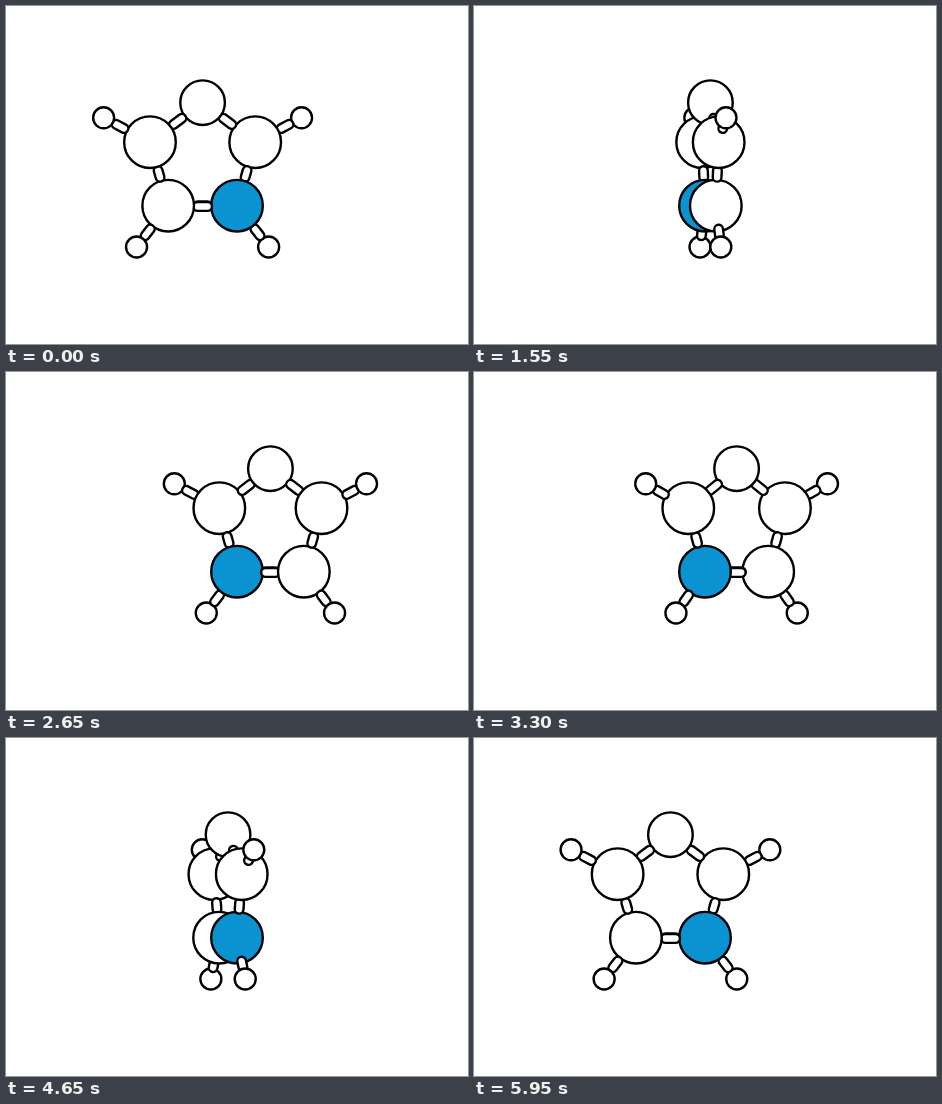
An HTML page with a canvas that plays this animation: 462 by 338 pixels, repeating every 6 s.

```html
<!DOCTYPE html>
<html lang="en">
<head>
<meta charset="utf-8">
<title>Rotating ring molecule</title>
<style>
  html, body { margin: 0; width: 100%; height: 100%; overflow: hidden; background: #fff; }
  canvas { display: block; }
</style>
</head>
<body>
<canvas id="stage" width="462" height="338"></canvas>
<script>
const ctx = document.getElementById('stage').getContext('2d');
const LOOP = 6000, STEP = 50, START = Math.PI / 30;
const AXIS = 231, MID = -34.6;      // the ring turns about the blue atom
const LINE = 2.4, BOND_R = 4.35, OVERLAP = 1.8;

// Positions in the ring plane: x is measured from the rotation axis.
const atom = (dx, y, r, color = '#fff') => ({ x: MID + dx, y, r, color });
const blue = atom(34.6, 199.7, 25.8, '#0a92d1');
const low = atom(-34.6, 199.7, 25.8);
const left = atom(-52.9, 136.2, 25.8);
const right = atom(52.9, 136.2, 25.8);
const top_ = atom(0, 96.7, 22.3);
const tips = [
  atom(-99.5, 111.8, 10.5), atom(99.5, 111.8, 10.5),
  atom(-66.4, 241, 10.5), atom(66.4, 241, 10.5)
];

// A capsule that fills the gap between two atoms and slightly overlaps both.
function bond(a, b, dy = 0) {
  const dx = b.x - a.x, h = b.y - a.y, len = Math.hypot(dx, h);
  const mid = (a.r + len - b.r) / 2;
  const half = (len - a.r - b.r) / 2 + OVERLAP - BOND_R - LINE / 2;
  const at = d => ({ x: a.x + dx * d / len, y: a.y + h * d / len + dy });
  return { x: at(mid).x, from: at(mid - half), to: at(mid + half) };
}

const parts = [
  blue, low, left, right, top_, ...tips,
  bond(low, blue), bond(low, blue, 0.8),
  bond(left, low), bond(right, blue), bond(left, top_), bond(right, top_),
  bond(left, tips[0]), bond(right, tips[1]), bond(low, tips[2]), bond(blue, tips[3])
];

function drawAtom(p, cos) {
  ctx.beginPath();
  ctx.arc(AXIS + p.x * cos, p.y, p.r, 0, Math.PI * 2);
  ctx.fillStyle = p.color;
  ctx.fill();
  ctx.lineWidth = LINE;
  ctx.strokeStyle = '#000';
  ctx.stroke();
}

function drawBond(p, cos) {
  ctx.beginPath();
  ctx.moveTo(AXIS + p.from.x * cos, p.from.y);
  ctx.lineTo(AXIS + p.to.x * cos, p.to.y);
  for (const [color, grow] of [['#000', LINE], ['#fff', -LINE]]) {
    ctx.strokeStyle = color;
    ctx.lineWidth = BOND_R * 2 + grow;
    ctx.stroke();
  }
}

function draw(time) {
  const step = Math.floor((time % LOOP) / STEP);
  const angle = START + step * STEP / LOOP * Math.PI * 2;
  const cos = Math.cos(angle), sin = Math.sin(angle);
  ctx.fillStyle = '#fff';
  ctx.fillRect(0, 0, 462, 338);
  ctx.lineCap = 'round';
  const depth = p => -p.x * sin;
  for (const p of [...parts].sort((a, b) => depth(a) - depth(b))) {
    (p.r ? drawAtom : drawBond)(p, cos);
  }
}

const began = performance.now();
function tick() {
  draw(performance.now() - began);
  requestAnimationFrame(tick);
}
tick();
</script>
</body>
</html>
```
